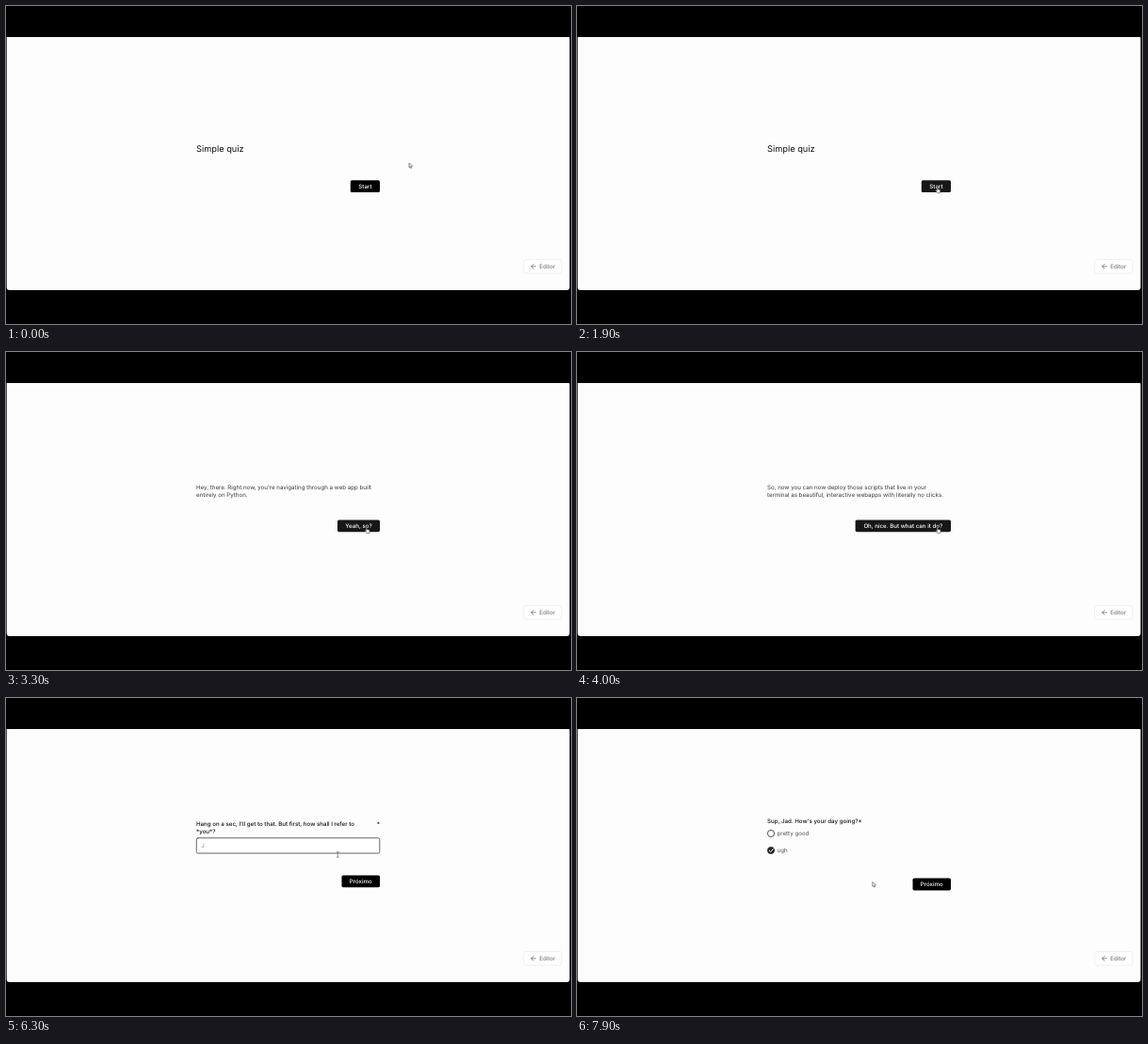
Animation of 600 by 338 pixels, one loop 8 s. Source, as an HTML page with a canvas:

```html
<!DOCTYPE html>
<html lang="en">
<head>
<meta charset="utf-8">
<title>Simple quiz</title>
<style>
  html, body { margin: 0; width: 100%; height: 100%; overflow: hidden; background: #000; }
  canvas { display: block; width: 600px; height: 338px; }
</style>
</head>
<body>
<canvas id="stage"></canvas>
<script>
const W = 600, H = 338, LOOP = 8000, STEP = 100;
const ZOOM = 0.385;
const INK = '#111', BODY = '#363b39', LEFT = 202, RIGHT = 397;

const canvas = document.getElementById('stage');
const ctx = canvas.getContext('2d');
const dpr = window.devicePixelRatio || 1;
canvas.width = W * dpr;
canvas.height = H * dpr;

const clamp = v => Math.max(0, Math.min(1, v));
const progress = (t, a, b) => clamp((t - a) / (b - a));
const ease = p => p * p * (3 - 2 * p);

function text(str, x, y, { size = 16, weight = 400, color = BODY, align = 'left' } = {}) {
  ctx.save();
  ctx.translate(x, y);
  ctx.scale(ZOOM, ZOOM);
  ctx.font = `${weight} ${size}px Inter, sans-serif`;
  ctx.textRendering = 'geometricPrecision';
  ctx.textAlign = align;
  ctx.fillStyle = color;
  ctx.fillText(str, 0, 0);
  ctx.restore();
}

function box(x, y, w, h, r, fill, stroke, line = 1) {
  ctx.beginPath();
  ctx.roundRect(x, y, w, h, r);
  if (fill) { ctx.fillStyle = fill; ctx.fill(); }
  if (stroke) { ctx.strokeStyle = stroke; ctx.lineWidth = line; ctx.stroke(); }
}

function path(points, close) {
  ctx.beginPath();
  points.forEach(([x, y]) => ctx.lineTo(x, y));
  if (close) ctx.closePath();
}

function stroke(color, width) {
  ctx.strokeStyle = color;
  ctx.lineWidth = width;
  ctx.lineJoin = ctx.lineCap = 'round';
  ctx.stroke();
}

function button(label, x, y, hover) {
  box(x, y, RIGHT - x, 12.8, 1.6, hover ? '#171717' : '#000');
  text(label, (x + RIGHT) / 2, y + 8.5, { weight: 500, color: '#fff', align: 'center' });
}

function lines(rows, y, style) {
  rows.forEach((row, i) => text(row, LEFT, y + i * 7.7, style));
}

function radio(label, y, checked) {
  ctx.beginPath();
  ctx.arc(206, y, 3.6, 0, Math.PI * 2);
  if (checked) { ctx.fillStyle = '#2b2b2b'; ctx.fill(); }
  stroke('#2b2b2b', 0.8);
  if (checked) {
    path([[204, y + 0.1], [205.5, y + 1.6], [208.3, y - 1.4]]);
    stroke('#fff', 1);
  }
  text(label, 212.5, y + 2.2, { color: '#4a524f' });
}

function inputValue(t) {
  return t >= 6500 ? 'Jad' : t >= 5900 ? 'J' : '';
}

function caretX(t) {
  if (t < 5200 || (t >= 5700 && t < 5900)) return 207.2;
  return t >= 5900 && t < 6300 ? 210.5 : 0;
}

const pages = [
  { from: -300, until: 1900, draw(t) {
    text('Simple quiz', LEFT, 155.2, { size: 24, color: INK });
    button('Start', 365.8, 185.2, t >= 800);
  } },
  { from: 2100, until: 3400, draw(t) {
    lines(["Hey, there. Right now, you're navigating through a web app built",
      'entirely on Python.'], 146.2);
    button('Yeah, so?', 352, 178.4, t >= 3200);
  } },
  { from: 3600, until: 4550, draw() {
    lines(['So, now you can now deploy those scripts that live in your',
      'terminal as beautiful, interactive webapps with literally no clicks.'], 146.2);
    button('Oh, nice. But what can it do?', 295.6, 178.4, true);
  } },
  { from: 4700, until: 6650, draw(t) {
    const style = { weight: 500, color: INK };
    lines(["Hang on a sec, I'll get to that. But first, how shall I refer to", '*you*?'], 136.2, style);
    text('*', RIGHT, 136.2, { ...style, align: 'right' });
    box(202.3, 148.8, 194.5, 16.2, 1.6, '#fff', '#555', 0.9);
    text(inputValue(t), 207.2, 159, { color: '#858585' });
    const x = caretX(t);
    if (x) { ctx.fillStyle = '#aaa'; ctx.fillRect(x, 153.6, 0.6, 6.6); }
    button('Próximo', 356.5, 188.4, false);
  } },
  { from: 6900, until: 9000, draw(t) {
    text("Sup, Jad. How's your day going?*", LEFT, 132.9, { weight: 500, color: INK });
    radio('pretty good', 144, false);
    radio('ugh', 162, t >= 7600);
    button('Próximo', 356.5, 191.6, false);
  } },
];

// start, end, x, y: each move begins where the previous one ended
const moves = [
  [0, 0, 428, 167],
  [400, 800, 381.5, 192.3],
  [3000, 3300, 381.8, 186.2],
  [5000, 5500, 352.3, 166.4],
  [7300, 7600, 206, 162],
  [7600, 7900, 313.8, 195.6],
];

function cursorAt(t) {
  let [, , x, y] = moves[0];
  for (const [a, b, toX, toY] of moves.slice(1)) {
    const p = ease(progress(t, a, b));
    x += (toX - x) * p;
    y += (toY - y) * p;
  }
  return [x, y];
}

function cursorKind(t) {
  if ((t >= 800 && t < 2100) || (t >= 3200 && t < 4750)) return 'hand';
  return t >= 5300 && t < 6900 ? 'beam' : 'arrow';
}

const cursors = {
  arrow() {
    path([[0, 0], [0, 4.7], [1.1, 3.8], [1.9, 5.5], [2.6, 5.2], [1.9, 3.5], [3.3, 3.4]], true);
    ctx.fillStyle = '#f4f4f4';
    ctx.fill();
    stroke('#555', 0.65);
  },
  hand() {
    path([[0.5, 0], [1.3, 0.2], [1.4, 2.3], [3.9, 2.9], [4.4, 3.8],
      [3.8, 6.5], [1.3, 6.5], [-0.8, 3.8], [-0.3, 3.3], [0.4, 4]], true);
    ctx.fillStyle = '#fff';
    ctx.fill();
    stroke('#333', 0.55);
  },
  beam() {
    path([[-1.1, -2.9], [0, -2.4], [1.1, -2.9]]);
    stroke('#666', 0.7);
    path([[0, -2.4], [0, 2.4]]);
    stroke('#666', 0.7);
    path([[-1.1, 2.9], [0, 2.4], [1.1, 2.9]]);
    stroke('#666', 0.7);
  },
};

function drawFrame() {
  ctx.fillStyle = '#000';
  ctx.fillRect(0, 0, W, H);
  box(0.7, 33, 597.8, 269.1, [0, 1, 3, 3], '#fdfdfd');
  box(549.8, 269.6, 40.2, 14.4, 2.5, '#fff', '#ececec', 0.8);
  path([[562.6, 276.8], [557.8, 276.8]]);
  stroke('#666', 0.75);
  path([[560.1, 274.5], [557.8, 276.8], [560.1, 279.1]]);
  stroke('#666', 0.75);
  text('Editor', 566.2, 279.1, { weight: 500, color: '#7c7c7c' });
}

function render(now) {
  const t = Math.floor((now % LOOP) / STEP) * STEP;
  ctx.setTransform(dpr, 0, 0, dpr, 0, 0);
  drawFrame();
  for (const page of pages) {
    const alpha = progress(t, page.from, page.from + 300) * (1 - progress(t, page.until, page.until + 200));
    if (!alpha) continue;
    ctx.globalAlpha = alpha;
    page.draw(t);
  }
  ctx.globalAlpha = 1;
  ctx.translate(...cursorAt(t));
  cursors[cursorKind(t)]();
}

function tick() {
  render(performance.now());
  requestAnimationFrame(tick);
}
tick();
</script>
</body>
</html>
```
